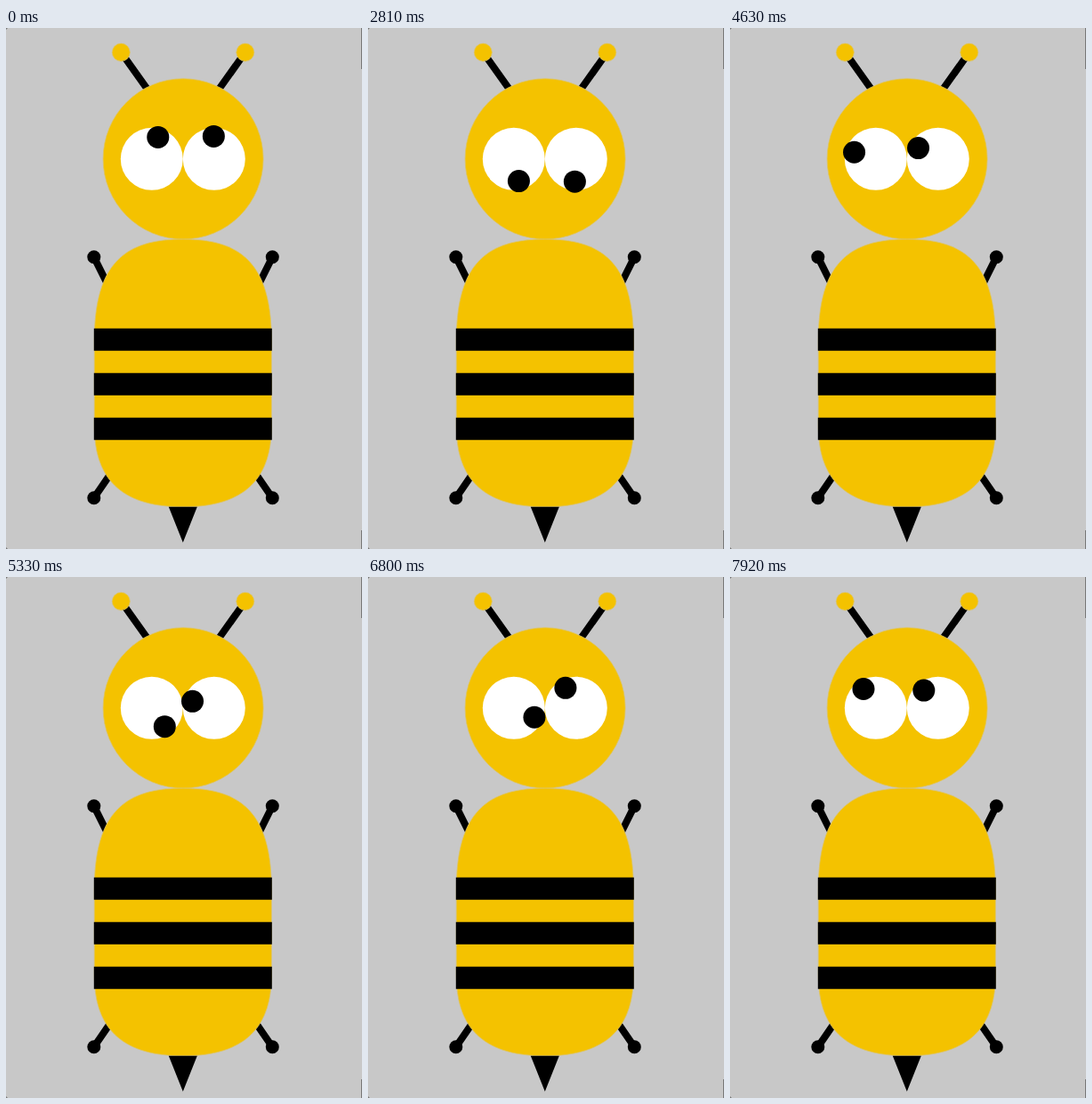
Animation, 400 px wide and 584 px high, one loop 7990 ms. Source, as an HTML page:

```html
<!DOCTYPE html>
<html lang="en">
<head>
<meta charset="utf-8">
<title>Bee</title>
<style>
  html, body { margin: 0; width: 100%; height: 100%; overflow: hidden; background: #c8c8c8; }
  svg { display: block; width: 400px; height: 584px; }
  .gold { fill: #f4c200; stroke: #dec565; stroke-width: .8; }
  .line { stroke: #000; stroke-width: 8; }
</style>
</head>
<body>
<svg viewBox="0 0 400 584">
  <path fill="#777" d="M0 0h2l-2 2zM399 0h1v46h-1zM0 584v-2l2 2zM399 563h1v21h-1z"/>
  <g transform="translate(-.2 -.2)">
    <defs>
      <g id="limbs">
        <path class="line" d="M129.500 27.500 162 73M99 257 115 289M99 527 119 498"/>
        <circle cx="99" cy="257" r="7.5"/>
        <circle cx="99" cy="527" r="7.5"/>
        <circle class="gold" cx="129.5" cy="27.5" r="10"/>
      </g>
    </defs>
    <use href="#limbs"/>
    <use href="#limbs" transform="matrix(-1 0 0 1 398.500 0)"/>
    <circle class="gold" cx="199.3" cy="147" r="90"/>
    <path class="gold" d="M99.500 350C99.500 262 136 237 199 237S298.500 262 298.500 350V447C298.500 511 262 537 199 537S99.500 511 99.500 447Z"/>
    <path d="M99 337h200v25h-200zM99 387h200v25h-200zM99 437h200v25h-200zM183 537h32l-16 40z"/>
    <circle cx="164" cy="147" r="35" fill="#fff"/>
    <circle cx="234" cy="147" r="35" fill="#fff"/>
    <circle id="left" r="12.5"/>
    <circle id="right" r="12.5"/>
  </g>
</svg>
<script>
  const LOOP = 7990, HOLD = 500, STEP = 70, ORBIT = 25.4;

  // Both pupils aim at one unseen point; aim is where each eye measures from.
  const pupils = [
    { el: document.getElementById("left"), x: 164, y: 147, aim: [0, 0] },
    { el: document.getElementById("right"), x: 234, y: 147, aim: [70, 55] }
  ];

  // The point glides through evenly timed stops and rests between strokes.
  const strokes = [
    { from: 430, to: 780, stops: [[65, -227], [30, 40], [-358, 428]] },
    { from: 1200, to: 2110, stops: [[-358, 428], [-138, 392]] },
    { from: 2320, to: 3230, stops: [[-138, 392], [49, 271], [122, 74]] },
    { from: 3440, to: 6240, stops: [[122, 74], [177, 12], [48, -64], [-70, -20],
                                    [-8, 55], [39, 36], [43, 34], [12, 45]] },
    { from: 6380, to: 7920, stops: [[12, 45], [45, 28], [165, -12], [0, 200], [-103, -159]] }
  ];

  // Catmull-Rom curve through the stops, p from 0 to 1.
  function along(stops, p) {
    const last = stops.length - 1;
    const i = Math.min(Math.floor(p * last), last - 1);
    const u = p * last - i;
    const [a, b, c, d] = [-1, 0, 1, 2].map(k => stops[Math.max(0, Math.min(last, i + k))]);
    return [0, 1].map(n => b[n] + u / 2 * (c[n] - a[n]
      + u * (2 * a[n] - 5 * b[n] + 4 * c[n] - d[n] + u * (3 * (b[n] - c[n]) + d[n] - a[n]))));
  }

  function gazeAt(t) {
    const s = strokes.filter(s => s.from <= t).pop() || strokes[0];
    const p = (t - s.from) / (s.to - s.from);
    return along(s.stops, Math.max(0, Math.min(1, p)));
  }

  function draw(now) {
    const t = now % LOOP;
    const shown = t < HOLD ? 0 : HOLD + Math.floor((t - HOLD) / STEP) * STEP;
    const [gx, gy] = gazeAt(shown);
    for (const { el, x, y, aim } of pupils) {
      const a = Math.atan2(gy - aim[1], gx - aim[0]);
      el.setAttribute("cx", x + ORBIT * Math.cos(a));
      el.setAttribute("cy", y + ORBIT * Math.sin(a));
    }
  }

  const start = performance.now();
  function tick() {
    draw(performance.now() - start);
    requestAnimationFrame(tick);
  }
  tick();
</script>
</body>
</html>
```
